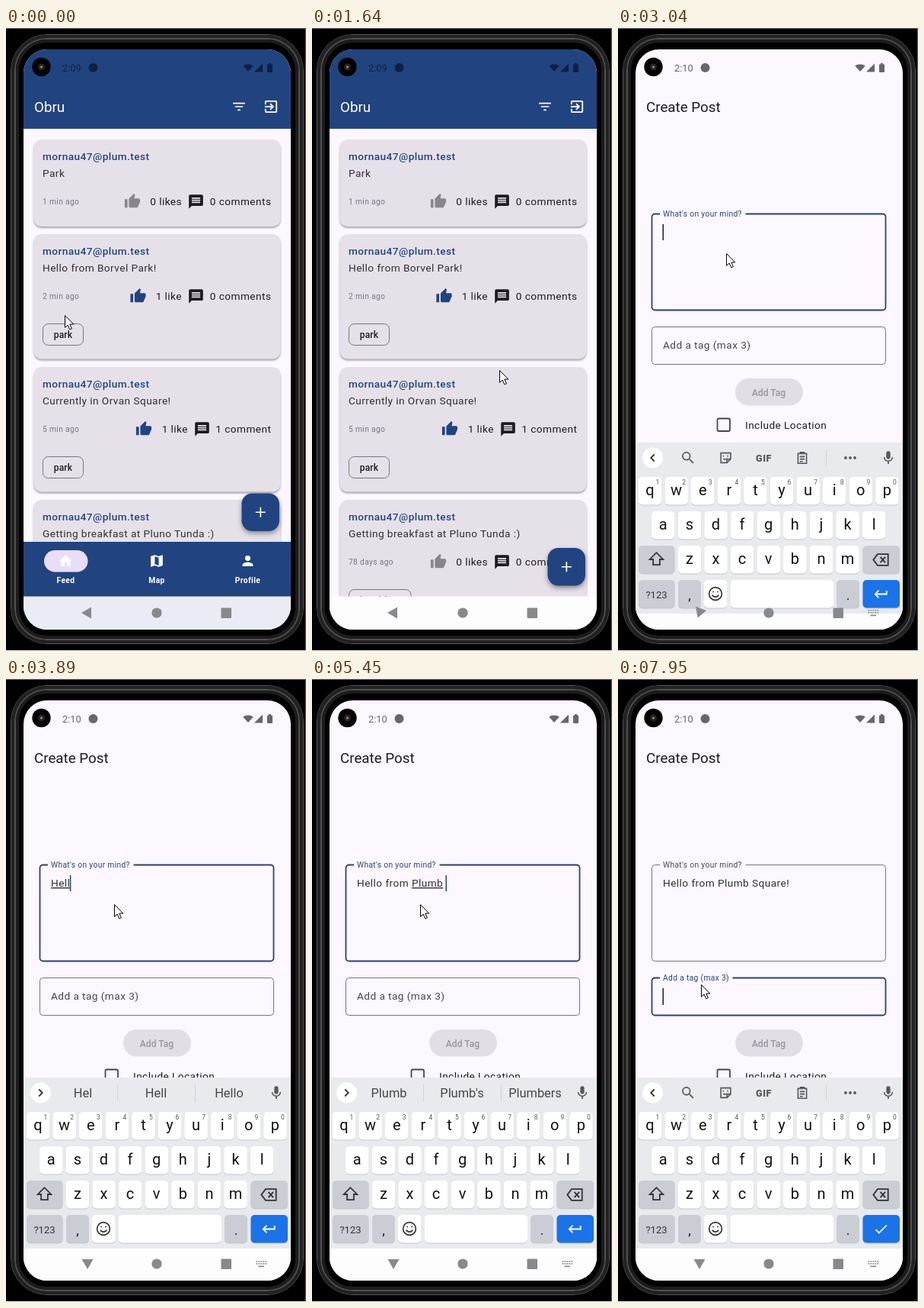
An HTML page that plays this animation: 394x816 px, repeating every 8 s.

```html
<!DOCTYPE html>
<html lang="en">
<head>
<meta charset="utf-8">
<title>Feed and post</title>
<style>
  html, body { margin: 0; width: 100%; height: 100%; overflow: hidden; background: #000; }
  svg { display: block; width: 394px; height: 816px; font-family: Roboto, sans-serif; }
  text { white-space: pre; }
  .lift { filter: drop-shadow(0 2px 1.3px #0005); }
  .fab { filter: drop-shadow(0 3px 3px #0006); }
</style>
</head>
<body>
<svg id="stage" viewBox="0 0 394 816"></svg>
<script>
const LOOP = 8000;
const BLUE = '#214480', INK = '#1d1b20', NOTE = '#302e34', GRAY = '#79747e', LABEL = '#49454f', PAGE = '#fdf7ff';
const MAIL = 'mornau47@plum.test';
const POST = 'Hello from Plumb Square!';
const BODY = 13.67, SMALL = 10.25, TRACK = 0.43;

const ICON = {
  home: 'M10 20v-6h4v6h5v-8h3L12 3 2 12h3v8z',
  map: 'M20.5 3l-.16.03L15 5.1 9 3 3.36 4.9c-.21.07-.36.25-.36.48V20.5c0 .28.22.5.5.5l.16-.03L9 18.9l6 2.1 5.64-1.9c.21-.07.36-.25.36-.48V3.5c0-.28-.22-.5-.5-.5zM15 19l-6-2.11V5l6 2.11z',
  person: 'M12 12a4 4 0 100-8 4 4 0 000 8zm0 2c-2.67 0-8 1.34-8 4v2h16v-2c0-2.66-5.33-4-8-4z',
  exit: 'M10.09 15.59L11.5 17l5-5-5-5-1.41 1.41L12.67 11H3v2h9.67zM19 3H5c-1.11 0-2 .9-2 2v4h2V5h14v14H5v-4H3v4c0 1.1.89 2 2 2h14c1.1 0 2-.9 2-2V5c0-1.1-.9-2-2-2z',
  filter: 'M10 18h4v-2h-4zM3 6v2h18V6zm3 7h12v-2H6z',
  thumb: 'M1 21h4V9H1zm22-11c0-1.1-.9-2-2-2h-6.31l.95-4.57.03-.32c0-.41-.17-.79-.44-1.06L14.17 1 7.59 7.59C7.22 7.95 7 8.45 7 9v10c0 1.1.9 2 2 2h9c.83 0 1.54-.5 1.84-1.22l3.02-7.05c.09-.23.14-.47.14-.73z',
  comment: 'M20 2H4c-1.1 0-2 .9-2 2v18l4-4h14c1.1 0 2-.9 2-2V4c0-1.1-.9-2-2-2zm-2 12H6v-2h12zm0-3H6V9h12zm0-3H6V6h12z',
  mic: 'M12 14c1.66 0 3-1.34 3-3V5a3 3 0 00-6 0v6c0 1.66 1.34 3 3 3zm5.3-3c0 3-2.54 5.1-5.3 5.1S6.7 14 6.7 11H5c0 3.41 2.72 6.23 6 6.72V21h2v-3.28c3.28-.48 6-3.3 6-6.72z',
  search: 'M15.5 14h-.79l-.28-.27A6.47 6.47 0 0016 9.5 6.5 6.5 0 109.5 16c1.61 0 3.09-.59 4.23-1.57l.27.28v.79l5 4.99L20.49 19zm-6 0a4.5 4.5 0 110-9 4.5 4.5 0 010 9z',
  enter: 'M19 7v4H5.83l3.58-3.59L8 6l-6 6 6 6 1.41-1.41L5.83 13H21V7z',
  check: 'M9 16.17L4.83 12l-1.42 1.41L9 19 21 7l-1.41-1.41z',
  wifi: 'M12 21L0 8c3-2.6 7.5-4 12-4s9 1.4 12 4z'
};
const OUTLINE = {
  left: 'M14.5 7l-5 5 5 5',
  right: 'M9.5 7l5 5-5 5',
  shift: 'M12 2L2 12h5v8h10v-8h5z',
  erase: 'M7 4h15v16H7l-6-8zm4 4l7 8m0-8l-7 8',
  smile: 'M12 2a10 10 0 100 20 10 10 0 000-20zM7 14c2 4 8 4 10 0M8.5 8v2m7-2v2',
  sticker: 'M4 4h16v10l-6 6H4zm16 10h-6v6M8 8v2m7-2v2m-7 3c1 2 4 2 6 0',
  clip: 'M5 5h14v16H5zm4 1V3h6v3M8 10h8m-8 4h8m-8 4h5'
};

// Pointer positions: time, x, y
const POINTER = [
  [0, 78, 377], [270, 40, 440], [406, 12, 540], [542, 150, 650], [678, 383, 700],
  [814, 350, 660], [950, 328, 628], [1370, 318, 610], [1500, 290, 540], [1640, 247, 449],
  [1890, 224, 390], [2040, 200, 350], [2430, 143, 296], [7220, 130, 330], [7370, 115, 380], [7510, 110, 401]
];
// Typing: time, characters shown, suggestions
const TYPING = [
  [0, 0, ''], [3620, 1, 'H|Hi|Hey'], [3710, 2, 'He|Hey|Her'], [3800, 3, 'Hel|Help|Hello'],
  [3890, 4, 'Hel|Hell|Hello'], [4010, 5, 'Hello|Hell|Hellos'], [4210, 7, 'f|for|from'],
  [4420, 8, 'fr|from|free'], [4620, 10, 'from|front|form'], [4760, 11, 'the|my|a'],
  [4880, 12, 'P|Please|Post'], [5000, 13, 'Pl|Please|Plan'], [5120, 15, 'Plum|Plumb|Plump'],
  [5290, 16, "Plumb|Plumb's|Plumbers"], [5450, 17, "Plumb|Plumb's|Plumbers"], [5700, 17, 'and|the|is'],
  [5820, 18, 'S|So|See'], [5970, 19, 'Sq|Square|Squad'], [6120, 20, 'Squ|Square|Squad'],
  [6400, 21, 'Squa|Square|Squad'], [6540, 22, 'Squar|Square|Squares'],
  [6680, 23, "Square|Squares|Square's"], [6810, 24, "Square|Squares|Square's"], [6940, 24, 'I|The|It']
];

const pen = document.createElement('canvas').getContext('2d');
const width = (s, size) => (pen.font = size + 'px Roboto, sans-serif', pen.measureText(s).width + TRACK * s.length);
const at = (list, t) => list.findLast(row => row[0] <= t);
const ramp = (t, a, b) => Math.min(1, Math.max(0, (t - a) / (b - a)));
const mix = (a, b, p) => a + (b - a) * p;

const rect = (x, y, w, h, r, fill, more = '') =>
  `<rect x="${x}" y="${y}" width="${w}" height="${h}" rx="${r}" fill="${fill}" ${more}/>`;
const box = (x, y, w, h, r, color, line) => rect(x, y, w, h, r, 'none', `stroke="${color}" stroke-width="${line}"`);
const dot = (x, y, r, fill) => `<circle cx="${x}" cy="${y}" r="${r}" fill="${fill}"/>`;
const path = (d, fill, more = '') => `<path d="${d}" fill="${fill}" ${more}/>`;
const text = (x, y, s, size = BODY, fill = INK, more = '', track = TRACK) =>
  `<text x="${x}" y="${y}" font-size="${size}" fill="${fill}" letter-spacing="${track}" ${more}>${s}</text>`;
const MID = 'text-anchor="middle"', END = 'text-anchor="end"', MEDIUM = 'font-weight="500"';
const place = (x, y, k) => `transform="translate(${x} ${y}) scale(${k}) translate(-12 -12)"`;
const icon = (x, y, k, name, fill) => path(ICON[name], fill, place(x, y, k));
const outline = (x, y, k, name, color, line = 2) =>
  path(OUTLINE[name], 'none', `stroke="${color}" stroke-width="${line}" ${place(x, y, k)}`);

function phone() {
  const ring = (inset, color, line) =>
    box(6 + inset, 8 + inset, 385 - 2 * inset, 799 - 2 * inset, 48 - inset, color, line);
  return rect(0, 0, 394, 816, 0, '#000') + path('M0 .5H393.5V816', 'none', 'stroke="#6a6a6a"') +
    path('M0 815.5H394', 'none', 'stroke="#eee"') +
    ring(.5, '#555', 1) + ring(3, '#222', 4) + ring(6, '#505050', 2) + ring(9, '#1c1c1c', 4);
}

function statusBar(t, color) {
  return dot(46.5, 51, 12.2, '#000') + dot(46.5, 51, 4.5, '#2a2321') + dot(46.5, 51, 1.6, '#a58670') +
    text(74, 57, t < 2580 ? '2:09' : '2:10', 12.8, color, '', 0) + dot(114.5, 52, 6, color) +
    icon(318, 52, .56, 'wifi', color) + path('M337 46.5v11h-11z', color) +
    rect(343, 47.5, 7, 10.5, 1, color) + rect(345, 46, 3, 2, 0, color);
}

function card(y, h, note, age, likes, comments, thumbX, liked, chipW, tag) {
  const likeEnd = comments[0] === '1' ? 239 : 231;
  return rect(36.5, y, 324, h, 10, '#e6e1e9', 'class="lift"') +
    text(48, y + 26.5, MAIL, BODY, BLUE, MEDIUM) + text(48, y + 49, note, BODY, NOTE) +
    text(48, y + 85, age, SMALL, GRAY, '', .34) +
    icon(thumbX, y + 81, .92, 'thumb', liked ? BLUE : '#88868a') +
    text(likeEnd, y + 86, likes, BODY, INK, END) +
    icon(likeEnd + 18.5, y + 81.5, .93, 'comment', INK) + text(348.4, y + 86, comments, BODY, INK, END) +
    (chipW ? box(48.5, y + 117.5, chipW, 28, 7, GRAY, 1) +
      text(48.5 + chipW / 2, y + 136, tag, 12, INK, MID + ' ' + MEDIUM, .2) : '');
}

function feed(t) {
  const leaving = t >= 1640, fabY = leaving ? 681 : 609.5;
  const tab = (x, name, label) => icon(x, 698, .87, name, '#fff') +
    text(x, 727, label, SMALL, '#fff', MID + ' font-weight="600"', .4);
  return rect(23, 28, 351, 104, 0, BLUE) + statusBar(t, '#0f2144') +
    text(37, 110, 'Obru', 18.8, '#fff', '', 0) +
    icon(306, 103, .87, 'filter', '#fff') + icon(348, 103, .9, 'exit', '#fff') +
    card(146, 114, 'Park', '1 min ago', '0 likes', '0 comments', 166, false) +
    card(270, 163.5, 'Hello from Borvel Park!', '2 min ago', '1 like', '0 comments', 173.5, true, 53, 'park') +
    card(444, 163.5, 'Currently in Orvan Square!', '5 min ago', '1 like', '1 comment', 181, true, 53, 'park') +
    card(618, 163.5, 'Getting breakfast at Pluno Tunda :)', '78 days ago', '0 likes', '0 comments', 166, false, 81.5, 'breakfast') +
    rect(309.5, fabY, 49.5, 49.5, 14, BLUE, 'class="fab"') +
    path(`M327.8 ${fabY + 24.75}h13m-6.5-6.5v13`, 'none', 'stroke="#fff" stroke-width="1.7"') +
    (leaving ? '' : rect(23, 673, 351, 72, 0, BLUE) + rect(50, 684, 57.5, 28.5, 14.2, '#e8def8') +
      tab(78.5, 'home', 'Feed') + tab(198, 'map', 'Map') + tab(317.5, 'person', 'Profile')) +
    rect(23, 744.5, 351, 44, 0, leaving ? '#fdfdfd' : '#e9ecf4');
}

function field(y, h, label, focused, lift) {
  const size = mix(BODY, SMALL, lift), color = focused ? BLUE : LABEL;
  return box(44.5, y + .5, 307, h, 4, focused ? BLUE : GRAY, focused ? 1.8 : 1) +
    (lift ? rect(55, y - 2, (width(label, SMALL) + 7) * lift, 5, 0, PAGE) : '') +
    text(59, mix(y + 29.2, y + 3.6, lift), label, size, color, '', mix(TRACK, .34, lift));
}

function message(t) {
  const [, count, hints] = at(TYPING, t), typed = POST.slice(0, count);
  const tail = typed.match(/(\w+) ?$/);
  let markup = typed;
  if (tail && hints.split('|').includes(tail[1]))
    markup = typed.slice(0, tail.index) + `<tspan text-decoration="underline">${tail[1]}</tspan>`;
  const caretX = 59 + width(typed, BODY);
  const caret = t >= 2580 && t < 7660 ? rect(caretX - .5, 257, 1.5, 21, 0, count ? BLUE : INK) : '';
  return text(59, 272, markup, BODY, NOTE) + caret;
}

function compose(t) {
  const first = ramp(t, 2530, 2680), second = ramp(t, 7650, 7800);
  return statusBar(t, '#68656c') + text(37, 110, 'Create Post', 18.8, INK, '', 0) +
    field(243, 126, "What's on your mind?", t >= 2530 && t < 7650, first) + message(t) +
    field(391, 49, 'Add a tag (max 3)', t >= 7650, second) +
    (t >= 7700 ? rect(58.5, 405, 1.5, 22, 0, INK) : '') +
    rect(154, 459, 89, 35.5, 17.7, '#e3dde5') + text(198, 481.5, 'Add Tag', 12, '#99959d', MID + ' ' + MEDIUM, .1) +
    box(130.5, 511.5, 16.5, 16.5, 2, LABEL, 1.8) + text(167, 525, 'Include Location') +
    rect(44, 559, 308, 35.5, 17.7, '#284882') + text(198, 581.5, 'Post', 12, '#fff', MID + ' ' + MEDIUM, .1) +
    rect(23, 744.5, 351, 44, 0, '#fdfdfd');
}

function strip(t) {
  const tools = t < 3620 || t >= 7800, ink = '#55585c';
  const divider = x => rect(x, 531, 1, 22, 0, '#cfd1d5');
  let out = dot(45.5, 542, 13.5, '#fff') + outline(45.5, 542, .9, tools ? 'left' : 'right', '#333') +
    icon(355, 542, .88, 'mic', ink);
  if (tools) {
    out += icon(92, 542, .88, 'search', ink) + outline(141.5, 542, .8, 'sticker', ink) +
      text(191.5, 546.5, 'GIF', 12.5, ink, MID + ' font-weight="900"', .6) +
      outline(242, 542, .8, 'clip', ink) + divider(273) +
      [299, 305, 311].map(x => dot(x, 542, 1.9, ink)).join('');
  } else {
    out += divider(146) + divider(248) + at(TYPING, t)[2].split('|')
      .map((s, i) => text(101 + 96 * i, 548, s, 16.4, '#44474b', MID, 0)).join('');
  }
  return out;
}

function keyboard(t) {
  if (t < 2890) return '';
  const key = (x, y, w, fill) => rect(x, y + 1, w, 36.5, 5, '#c3c5ca') + rect(x, y, w, 36.5, 5, fill);
  const letter = (c, x, y) => key(x - 15.2, y, 30.5, '#fff') + text(x, y + 24, c, 20, '#111', MID, 0);
  const row = (s, x0, y) => [...s].map((c, i) => letter(c, x0 + 34.6 * i, y)).join('');
  const dim = '#cacdd4', shiftY = t < 3040 ? 110 : t < 3190 ? 21 : 0;
  const digits = [...'1234567890'].map((n, i) => text(52 + 34.6 * i, 577, n, 8.5, '#555', MID, 0)).join('');
  return `<g transform="translate(0 ${shiftY})">` + rect(23, 522, 351, 224, 0, '#e8eaed') + strip(t) +
    row('qwertyuiop', 42, 567) + digits + row('asdfghjkl', 59.3, 612) + row('zxcvbnm', 93.9, 657) +
    key(27, 657, 47.5, dim) + outline(50.5, 675, .88, 'shift', '#333') +
    key(321.5, 657, 48.5, dim) + outline(345.5, 675.5, .92, 'erase', '#333') +
    key(27, 702, 47.5, dim) + text(50.5, 726, '?123', 13, '#333', MID, 0) +
    key(79, 702, 30, dim) + text(94, 728, ',', 18, '#222', MID, 0) +
    key(113, 702, 30.5, '#fff') + outline(128, 720, .84, 'smile', '#333') +
    key(147.5, 702, 135.5, '#fff') +
    key(287, 702, 30, dim) + text(302, 728, '.', 18, '#222', MID, 0) +
    key(321.5, 702, 48.5, '#1a73e8') + icon(345.5, 720.5, .9, t < 7660 ? 'enter' : 'check', '#fff') + '</g>';
}

function systemBar(t) {
  const ink = '#88898d', turn = t < 2890 ? 0 : t < 3040 ? -35 : t < 3190 ? -70 : -90;
  let keys = '';
  if (t >= 2890) {
    for (let i = 0; i < 10; i++) keys += rect(328.5 + i % 5 * 3, 762 + (i / 5 | 0) * 3, 1.7, 1.7, 0, ink);
    keys += rect(331.5, 768.5, 7.5, 1.7, 0, ink);
  }
  return path('M-7 0L6-7.5V7.5z', ink, `transform="translate(${turn ? 107 : 106} 766) rotate(${turn})"`) +
    dot(198, 766, 6.6, ink) + rect(282.5, 759.5, 13.5, 13.5, 1, ink) + keys;
}

function pointer(t) {
  const [, x, y] = at(POINTER, t);
  return path('M.5.5v15.8l3.6-3.3 2.7 5.8 2.6-1.1-2.6-5.7h5z', '#fff',
    `stroke="#000" transform="translate(${x - 1} ${y - 1})"`);
}

function scene(t) {
  return '<clipPath id="screen">' + rect(23, 28, 351, 760, 31, '#fff') + '</clipPath>' + phone() +
    '<g clip-path="url(#screen)">' + rect(23, 28, 351, 760, 0, PAGE) +
    (t < 1890 ? feed(t) : compose(t)) + keyboard(t) + systemBar(t) + '</g>' + pointer(t);
}

const stage = document.getElementById('stage');
let shown = '';
function frame() {
  const next = scene(performance.now() % LOOP);
  if (next !== shown) stage.innerHTML = shown = next;
  requestAnimationFrame(frame);
}
frame();
</script>
</body>
</html>
```
